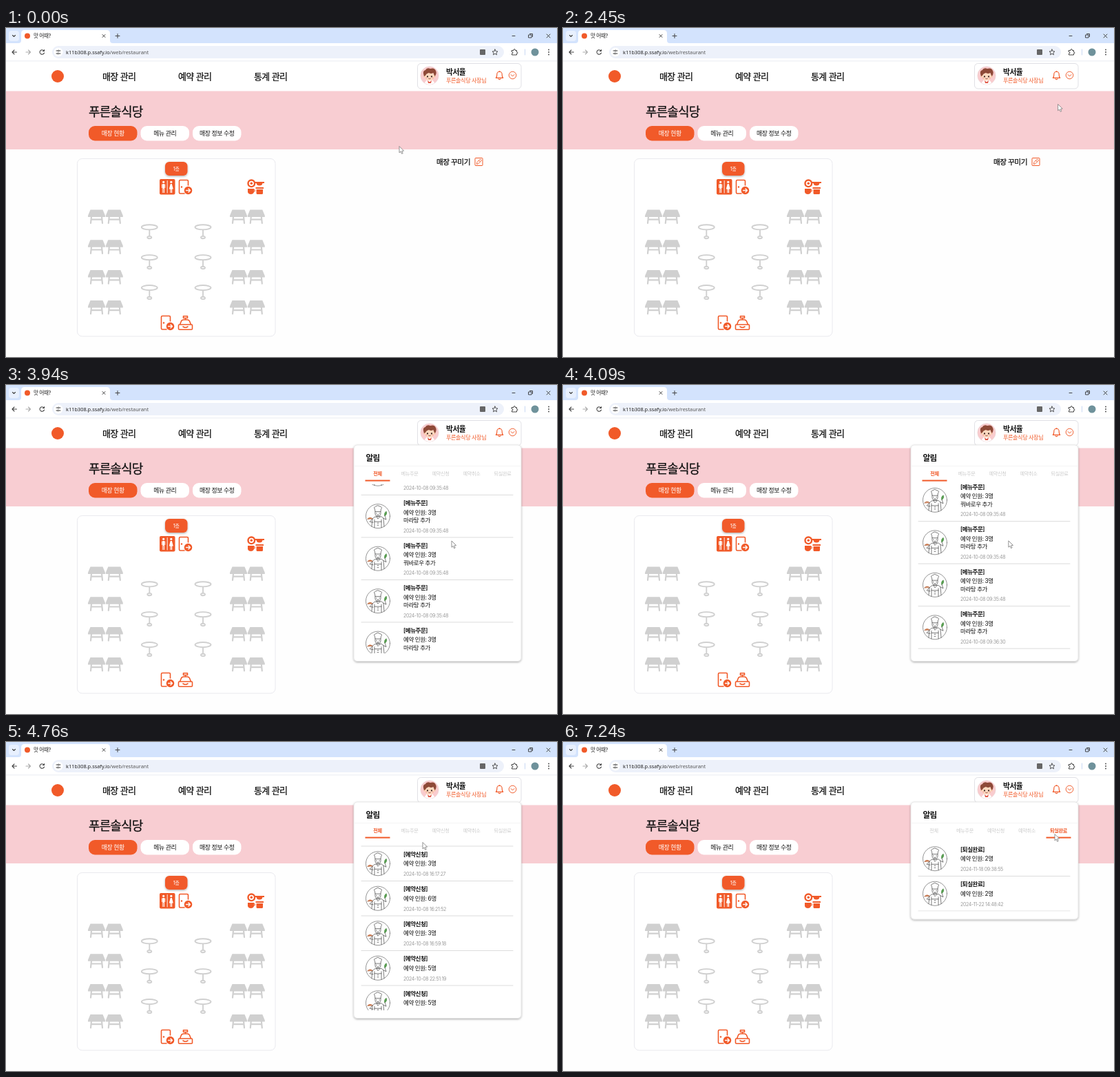
Recreate the animation shown at these times as an HTML page. Size 800x477 px, loop 7.45 s.

```html
<!DOCTYPE html>
<html lang="ko">
<head>
<meta charset="utf-8">
<title>매장 현황</title>
<style>
  html, body { margin: 0; width: 100%; height: 100%; overflow: hidden; background: #fefefe; }
  svg { display: block; width: 100%; height: 100%; }
  text { font-family: Inter, "Noto Sans CJK KR", "Noto Sans CJK", sans-serif; letter-spacing: -.05em; white-space: pre; }
  .url { font-family: "Noto Sans", "Open Sans", sans-serif; letter-spacing: 0; }
  .medium { fill: #111; stroke: #111; stroke-width: .25px; }
  .line { fill: none; stroke-linecap: round; stroke-linejoin: round; }
</style>
</head>
<body>
<svg id="stage" viewBox="0 0 800 477" xmlns="http://www.w3.org/2000/svg">
  <defs>
    <filter id="shadow" x="-10%" y="-10%" width="120%" height="125%">
      <feDropShadow dx="0" dy="1.2" stdDeviation="1.5" flood-opacity=".32"/>
    </filter>
    <clipPath id="listClip"><rect id="clipBox" x="505" y="144" width="243" height="245"/></clipPath>

    <g id="table" fill="#d0d0d0">
      <path d="M3.5 0H21.5L25 8.5V10.5H0V8.5Z"/>
      <path class="line" d="M5 10L4 19.5M20 10L21 19.5M5 14.2H20" stroke="#d0d0d0" stroke-width="2.2"/>
    </g>
    <g id="round" class="line" stroke="#d0d0d0" stroke-width="1.9">
      <ellipse rx="11.5" ry="3.6"/><path d="M0 4V13"/><ellipse cy="14.8" rx="3" ry="1.7"/>
    </g>
    <g id="door">
      <path class="line" d="M13.5 8V2Q13.5 .5 12 .5H2Q.5 .5 .5 2V18.5Q.5 20 2 20H8" stroke="#f15a29" stroke-width="1.6"/>
      <circle cx="4" cy="10.5" r="1.2" fill="#f15a29"/>
      <circle cx="13.5" cy="15.5" r="5.8" fill="#f15a29"/>
      <path class="line" d="M10.5 15.5H16.3M14 13L16.5 15.5L14 18" stroke="#fff" stroke-width="1.3"/>
    </g>
    <g id="chef" class="line" stroke="#444" stroke-width=".7">
      <circle r="17.5" fill="#fff" stroke="#666"/>
      <path d="M-9 14.8L-8 4Q-6 1 -2 .5L2 .5Q6 0 8 3L9 14.8M-5 5V16.5M5 5V16.5M-5 8H5M-2 1L0 4L3 1"/>
      <path d="M-8 4L-12 8L-7 9M8 3L12 5L10 -1"/>
      <path d="M-4 -7Q-5 0 0 .8Q5 0 4 -7"/>
      <path d="M-4 -7L-4.5 -10Q-7 -13 -3.5 -14Q0 -17 3 -14Q7 -13.5 4.5 -10L4 -7Z" fill="#fff"/>
      <path d="M-2 -4.5V-4M2 -4.5V-4M-1.5 -1.7Q0 -.6 1.5 -1.7" stroke-width=".9"/>
      <path d="M-15 4Q-12 .5 -8 3.5Z" fill="#e78b54" stroke="#a75a35"/>
      <path d="M9.5 -1Q9 -5 12 -7Q14 -4 11 -1Z" fill="#5aa653" stroke="#478440"/>
      <path d="M-1 10H1M-1 13H1"/>
    </g>
  </defs>
  <g id="page"></g>
  <g id="bell" class="line" stroke="#f15a29" stroke-width="1.15">
    <path d="M-5.2 3.6Q-3.7 2 -3.7 -.8V-1.6A3.7 3.9 0 0 1 3.7 -1.6V-.8Q3.7 2 5.2 3.6Z"/>
    <path d="M-1.5 5.2Q0 6.6 1.5 5.2M0 -5.5V-6"/>
  </g>
  <g id="popup">
    <rect id="panel" x="505" y="87" width="243" height="313" rx="5" fill="#fff" stroke="#ddd" stroke-width=".7" filter="url(#shadow)"/>
    <g id="tabs"></g>
    <g clip-path="url(#listClip)"><g id="list"></g></g>
  </g>
  <path id="cursor" d="M0 0V9.3L2.1 7.5L3.6 10.8L5.2 10.1L3.7 6.9L6.6 6.6Z" fill="#fff" stroke="#777" stroke-width=".8" stroke-linejoin="round"/>
</svg>
<script>
const $ = id => document.getElementById(id);
const ORANGE = '#f15a29', LOOP = 7450, LIST_TOP = 144, LIST_MAX = 245;

// Text placed by its vertical centre
const text = (x, cy, size, str, extra = '') =>
  `<text x="${x}" y="${cy + size * .37}" font-size="${size}" ${extra}>${str}</text>`;
const mid = 'text-anchor="middle"';
const box = (x, y, w, h, r, fill, extra = '') =>
  `<rect x="${x}" y="${y}" width="${w}" height="${h}" rx="${r}" fill="${fill}" ${extra}/>`;
const line = (d, color, width = 1) =>
  `<path class="line" d="${d}" stroke="${color}" stroke-width="${width}"/>`;
const dot = (x, y, r, fill, extra = '') => `<circle cx="${x}" cy="${y}" r="${r}" fill="${fill}" ${extra}/>`;
const use = (id, x, y) => `<use href="#${id}" x="${x}" y="${y}"/>`;

function browser() {
  const ink = '#444';
  return box(0, 0, 800, 30, 0, '#d3e3fd') + box(0, 22, 800, 26, 0, '#fff') +
    box(4, 4, 15, 15, 4, '#e8f0fe') + line('M9.5 10.5L11.5 12.5L13.5 10.5', ink, 1.1) +
    '<path d="M18 22Q22 22 22 18V8Q22 3 27 3H146Q151 3 151 8V18Q151 22 155 22Z" fill="#fff"/>' +
    dot(31, 11.5, 4, ORANGE) + text(40, 11.5, 7.6, '맛 어때?', 'fill="#222"') +
    line('M140 9.5L144 13.5M144 9.5L140 13.5M159 11.5H165M162 8.5V14.5', ink) +
    line('M735 11.5H739M785 9L790 14M790 9L785 14M759 10H763V14H759ZM760.5 8.5H764.5V12.5', '#333', .9) +
    line('M15.5 35H9M12 32L9 35L12 38', ink, 1.1) +
    line('M29 35H35.5M32.5 32L35.5 35L32.5 38', '#aaa', 1.1) +
    line('M55 33A3.3 3.3 0 1 0 55.5 36M55.5 31.5V33.5H53.5', ink, 1.1) +
    box(67, 26, 656, 18, 9, '#edf1fa') + dot(76, 35, 6.5, '#fff') +
    line('M73 33H75M77.5 33H79M73 37H74.5M77 37H79', ink) +
    dot(76.2, 33, 1, 'none', `stroke="${ink}" stroke-width=".8"`) +
    dot(75.6, 37, 1, 'none', `stroke="${ink}" stroke-width=".8"`) +
    text(87, 35, 7.4, 'k11b308.p.ssafy.io<tspan fill="#555">/web/restaurant</tspan>', 'class="url" fill="#222"') +
    box(688, 31, 8, 8, 1, '#666') +
    line('M710 31L711.2 33.7L714 34L711.9 35.9L712.5 38.8L710 37.3L707.5 38.8L708.1 35.9L706 34L708.8 33.7Z', ink, .9) +
    line('M734.5 32.5H737Q737 30.5 738.2 30.5Q739.4 30.5 739.4 32.5H741.5V35Q743 35 743 36Q743 37 741.5 37V39H734.5V37Q736 37 736 36Q736 34.5 734.5 34.5Z', ink) +
    line('M753.5 31V39', '#c9d8f3') + dot(768, 35, 5.5, '#6f929b') +
    dot(788, 31.5, .9, ink) + dot(788, 35, .9, ink) + dot(788, 38.5, .9, ink) +
    box(0, 47.5, 800, 1, 0, '#e4e8ef');
}

function avatar() {
  return '<g transform="translate(615 69)">' + dot(0, 0, 13.2, '#f9ccce', 'stroke="#e8d9da" stroke-width=".6"') +
    '<path d="M-7 11Q-6 6 0 6Q6 6 7 11Q0 15 -7 11Z" fill="#fff"/><path d="M-3 7L0 9.5L3 7L2 11H-2Z" fill="#e05340"/>' +
    dot(-7, 1, 1.8, '#f7c6a6') + dot(7, 1, 1.8, '#f7c6a6') +
    '<ellipse cy="1" rx="7" ry="6.3" fill="#fdd9bf"/>' +
    '<path d="M-8 1Q-11 -7 -6 -8Q-4 -12 1 -10Q7 -12 9 -7Q11 -3 7.5 1Q6 -2 5.5 -4Q2 -2 -1 -4Q-5 -3 -6 0Z" fill="#8e4a38"/>' +
    dot(-3, 1.4, 1.1, '#3a2523') + dot(3, 1.4, 1.1, '#3a2523') +
    dot(-4.8, 3.5, 1, '#f5a79c') + dot(4.8, 3.5, 1, '#f5a79c') + line('M-1.5 4.3Q0 5.5 1.5 4.3', '#8c3b35', .8) + '</g>';
}

function header() {
  const nav = ['매장 관리', '예약 관리', '통계 관리'].map((s, i) => text(140 + 110 * i, 70, 13, s, 'class="medium"'));
  const pills = ['매장 현황', '메뉴 관리', '매장 정보 수정'].map((s, i) =>
    box(120 + 75.5 * i, 142, 70.5, 21.5, 9, i ? '#fff' : ORANGE) +
    text(155.3 + 75.5 * i, 153, 8.9, s, `${mid} fill="${i ? '#111' : '#fff'}"`));
  return box(0, 48.5, 800, 43, 0, '#fff') + dot(75, 70, 9, ORANGE) + nav.join('') +
    box(0, 91.5, 800, 84.5, 0, '#f8cdd2') + text(120, 121, 18, '푸른솔식당', 'class="medium"') + pills.join('') +
    box(597.5, 51.5, 150.5, 36.5, 5, '#fff', 'stroke="#e0e0e5"') + avatar() +
    text(639, 64, 10.8, '박서율', 'font-weight="600" fill="#111"') +
    text(639, 76.5, 8.1, '푸른솔식당 사장님', `fill="${ORANGE}"`) +
    dot(735.5, 68.5, 5.3, 'none', `stroke="${ORANGE}"`) + line('M733 67.5L735.5 70L738 67.5', ORANGE) +
    text(625, 194, 10.7, '매장 꾸미기', 'class="medium"') +
    box(681, 188.5, 11, 11, 1, 'none', `stroke="${ORANGE}"`) +
    line('M683.5 197L684 194.5L688.5 190L690.5 192L686 196.5ZM686.5 192L688.5 194', ORANGE, .9);
}

function floor() {
  let s = box(103.5, 189.5, 287.5, 257.5, 7, '#fff', 'stroke="#e9e9ee"') +
    box(231, 194, 32.5, 20, 6, ORANGE, 'filter="url(#shadow)"') + text(247.2, 204.5, 7.3, '1층', `${mid} fill="#fff"`);
  for (let row = 0; row < 4; row++) {
    for (const x of [119, 144.8, 325, 350.8]) s += use('table', x, 263.5 + 43.8 * row);
    if (row < 3) for (const x of [208.3, 286]) s += use('round', x, 288.8 + 43.9 * row);
  }
  // Restroom sign
  s += box(223, 219, 22.5, 22.5, 2, ORANGE) + line('M234.2 221.5V239', '#fff', .9) +
    dot(228.7, 223.3, 1.6, '#fff') + dot(239.8, 223.3, 1.6, '#fff') +
    line('M226.6 227V231.5M230.8 227V231.5', '#fff', .9) +
    '<path d="M227.3 226H230.1V239H229.1V233H228.3V239H227.3ZM238.8 226H240.8L242.8 233.5H241.2V239H240.1V234H239.5V239H238.4V233.5H236.8Z" fill="#fff"/>';
  s += use('door', 251, 220) + use('door', 225, 417);
  // Kitchen: plate, pan, cup, pot
  s += dot(356.3, 225.3, 4.8, 'none', `stroke="${ORANGE}" stroke-width="2.4"`) + dot(356.3, 225.3, 1.8, ORANGE) +
    `<path d="M362 223H375V225H372.5Q372 228.5 368 228.5Q364 228.5 363.5 225H362ZM351 233H360V238Q359 241 355.5 241Q352 241 351 238ZM362.5 231H374V233H362.5ZM363.5 234H373V239.5Q373 241 371.5 241H365Q363.5 241 363.5 239.5Z" fill="${ORANGE}"/>` +
    line('M360 234.5H361.2V237H360', ORANGE);
  // Counter bell
  s += line('M257.5 417.8H263.5V420.5H257.5ZM260.5 420.5V423M252.5 430L254.5 425Q255.5 423 258 423H263Q265.5 423 266.5 425L268.5 430M251.5 430H269.5Q270.5 430 270.5 431.5V436Q270.5 437.3 269 437.3H252Q250.5 437.3 250.5 436V431.5Q250.5 430 251.5 430ZM257 433Q260.5 435.5 264 433', ORANGE, 1.6);
  return s;
}

const TABS = ['전체', '메뉴주문', '예약신청', '예약취소', '퇴실완료'];
const order = (menu, time) => ({ kind: 1, people: 3, menu, date: '2024-10-08 ' + time });
const visit = (kind, people, date) => ({ kind, people, date });
const notices = [
  visit(2, 3, '2024-10-08 09:31:44'),
  ...['마라탕', '콜라', '마라탕', '꿔바로우', '마라탕', '마라탕'].map(m => order(m, '09:35:48')),
  ...['마라탕', '마라탕', '콜라', '꿔바로우', '마라탕'].map(m => order(m, '09:36:30')),
  visit(2, 3, '2024-10-08 16:17:27'), visit(2, 6, '2024-10-08 16:21:52'),
  visit(2, 3, '2024-10-08 16:59:18'), visit(2, 5, '2024-10-08 22:51:19'),
  visit(2, 5, '2024-10-08 22:54:06'),
  visit(4, 2, '2024-11-18 09:38:55'), visit(4, 2, '2024-11-22 14:48:42')
];

function drawTabs(sel) {
  $('tabs').innerHTML = text(522.5, 105.5, 11.6, '알림', 'font-weight="600" fill="#111"') +
    line('M505.5 117.5H747.5', '#f5f5f5') +
    TABS.map((name, i) => {
      const on = i === sel, x = 538.5 + 45 * i + (on ? 1 : i > sel ? 2.5 : 0);
      return text(x, 128, 7.2, name, `${mid} fill="${on ? ORANGE : '#ccc'}" font-weight="${on ? 700 : 400}"`) +
        (on ? box(x - 18, 137.6, 36, 2, 0, ORANGE) : '');
    }).join('');
}

function drawList(sel) {
  let y = LIST_TOP, s = '';
  for (const n of notices.filter(n => !sel || n.kind === sel)) {
    const h = n.menu ? 61.5 : 50.5;
    s += use('chef', 540, y + h / 2) +
      text(577, y + 11.5, 8.5, `[${TABS[n.kind]}]`, 'font-weight="600" fill="#111"') +
      text(577, y + 25.2, 8.5, `예약 인원: ${n.people}명`, 'fill="#111"') +
      (n.menu ? text(577, y + 36.6, 8.5, n.menu + ' 추가', 'fill="#111"') : '') +
      text(577, y + h - 10, 7, n.date, 'fill="#999"') +
      line(`M516 ${y + h}H736`, '#d8d8d8', .9);
    y += h;
  }
  $('list').innerHTML = s;
  const h = Math.min(LIST_MAX, y - LIST_TOP + .5);
  $('clipBox').setAttribute('height', h);
  $('panel').setAttribute('height', LIST_TOP - 87 + h + 11.5);
}

// Interpolates [time, ...values] keys
function track(keys, t, ease = u => u) {
  const i = keys.findIndex(k => k[0] > t);
  if (i < 0) return keys[keys.length - 1].slice(1);
  if (!i) return keys[0].slice(1);
  const a = keys[i - 1], b = keys[i], u = ease((t - a[0]) / (b[0] - a[0]));
  return a.slice(1).map((v, j) => v + (b[j + 1] - v) * u);
}
const smooth = u => u * u * (3 - 2 * u);

const path = [
  [30, 571, 171.5], [760, 720, 102], [790, 720, 102], [1180, 714.5, 75.5], [1700, 714.5, 75.5],
  [2070, 732, 222], [2130, 732, 222], [2610, 714, 72], [3240, 714, 72], [3480, 615, 98.5],
  [3700, 640, 200], [3940, 647, 226], [4360, 646.5, 225.5], [4500, 646.5, 225.5], [4760, 605, 145.5],
  [4900, 590, 131], [5050, 590, 131], [5300, 636, 127], [5520, 640, 127], [5670, 662, 127],
  [6150, 662, 127], [6450, 714, 133.5]
];
const scroll = [[3700, 0], [3940, 157.5], [4360, 395], [4640, 720]];
const clicks = [3240, 4950, 5330, 5870, 6500];

let shown = null;
function frame(now) {
  const t = now % LOOP;
  const sel = clicks.filter(c => c <= t).length - 1;
  if (sel !== shown) {
    shown = sel;
    $('popup').style.display = sel < 0 ? 'none' : '';
    if (sel >= 0) { drawTabs(sel); drawList(sel); }
  }
  const [x, y] = track(path, t, smooth);
  const hover = Math.abs(x - 716.5) < 8 && Math.abs(y - 69) < 9;
  $('bell').setAttribute('transform', `translate(716.5 68.7) scale(${hover ? 1.18 : 1})`);
  $('cursor').setAttribute('transform', `translate(${x} ${y})`);
  $('list').setAttribute('transform', `translate(0 ${sel ? 0 : -track(scroll, t)[0]})`);
  requestAnimationFrame(frame);
}

$('page').innerHTML = browser() + header() + floor();
const start = performance.now();
requestAnimationFrame(now => frame(Math.max(0, now - start)));
</script>
</body>
</html>
```
